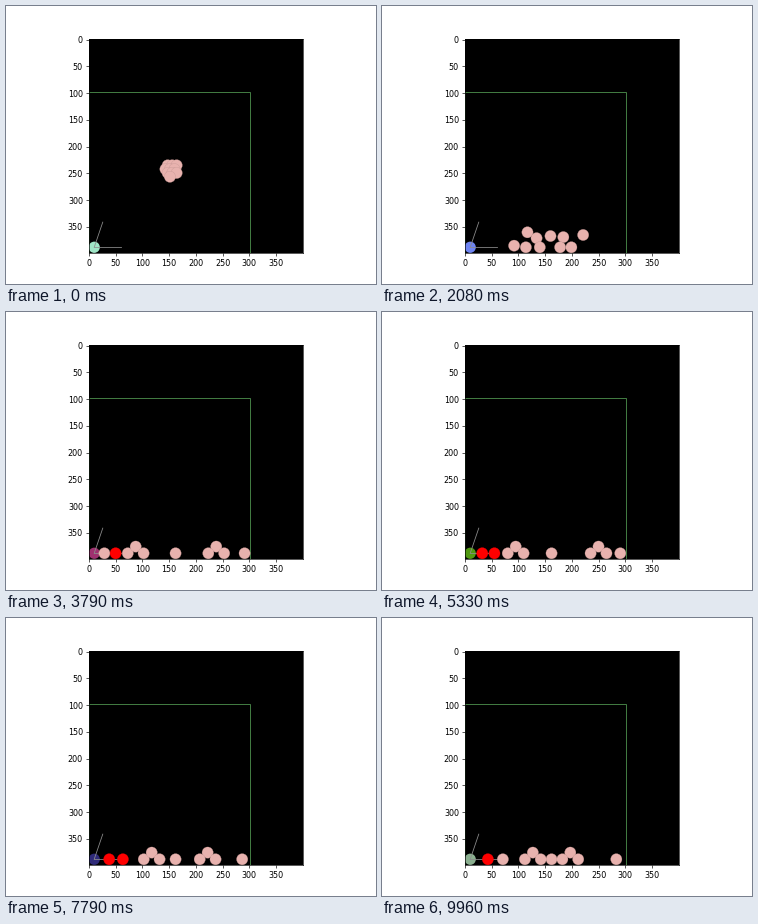
Animation, 370 px wide and 278 px high, one loop 10000 ms. Source, as a matplotlib script:

```python
import numpy as np
import matplotlib.pyplot as plt
from matplotlib.animation import FuncAnimation
from matplotlib.patches import Circle

LOOP_MS, FRAMES, DPI = 10000, 240, 64
RADIUS, FLOOR = 10.5, 388
PINK, RED, RIM, GREEN, GREY = "#e8b2ae", "#ff0000", "#bd908d", "#437d43", "#8c8c8c"
AGENT = np.array([10, FLOOR])

# Steps at which the cluster is spread, lands, is heaped up and has rolled out
BURST, IMPACT, PILE, REST = 21, 33, 49, 90
DROP, GRAVITY = 44, 0.085
SIDE, CAP = 14.8, 12.5  # pyramid: half its base, height of its top ball

# Cluster: a triangular lattice of three full rows and one ball below
CELLS = [(row, col) for row in range(3) for col in range(3)] + [(3, 1)]
BALLS = np.array([(138 + 20 * col - 10 * (row % 2), 267 + 17 * row)
                  for row, col in CELLS], float)
CENTRE = BALLS.mean(axis=0)

# Heap: x of each ball and its height above the floor
HEAP_X = np.array([117, 160, 221, 92, 134, 184, 114, 178, 199, 140])
HEAP_LIFT = np.array([28, 21, 23, 3, 17, 19, 0, 0, 0, 0])
REST_LIFT = np.array([0, 0, 0, 0, CAP, CAP, 0, 0, 0, 0])


def rolling(k):
    """x of the balls once two pyramids and four loose balls roll about."""
    u = (k - REST) / (FRAMES - 1 - REST)
    left = np.interp(k, [REST, 127, 206, 239], [87.5, 95, 125, 127])
    right = np.interp(k, [REST, 118, 239], [238, 254, 197])
    wall = np.interp(k, [118, 239], [291, 283])
    return np.array([left - SIDE, 162, wall, 29 + 14 * u, left,
                     right, 50 + 21 * u, right - SIDE, right + SIDE, left + SIDE])


def positions(k):
    """Centres of all balls at step k."""
    if k <= BURST:
        u = k / BURST
        spread = 0.42 + 0.58 * (1 - (1 - u) ** 3)
        return CENTRE + (BALLS - CENTRE) * spread + [0, DROP * (u**2 - 1)]

    if k <= PILE:
        n = k - BURST
        slide = max(k - IMPACT, 0) / (PILE - IMPACT)
        x = BALLS[:, 0] + (HEAP_X - BALLS[:, 0]) * slide
        y = np.minimum(BALLS[:, 1] + 3.4 * n + GRAVITY * n**2, FLOOR - HEAP_LIFT)
        return np.column_stack([x, y])

    n = k - PILE
    eased = 1 - (1 - min(n / (REST - PILE), 1)) ** 2
    x = HEAP_X + (rolling(max(k, REST)) - HEAP_X) * eased
    lift = np.maximum(HEAP_LIFT - n - GRAVITY * n**2, REST_LIFT)
    return np.column_stack([x, FLOOR - lift])


flicker = np.random.default_rng(7).random((FRAMES, 3))

fig, ax = plt.subplots(figsize=(370 / DPI, 278 / DPI), dpi=DPI)
ax.set_facecolor("black")
ax.set_aspect("equal")
ax.set_xlim(-0.5, 399.5)
ax.set_ylim(399.5, -0.5)
ax.set_xticks(range(0, 400, 50))
ax.set_yticks(range(0, 400, 50))
ax.spines.right.set_position(("outward", 0.6))
ax.tick_params(length=3.15, pad=3.15, width=0.72, labelsize=9)
for spine in ax.spines.values():
    spine.set_linewidth(0.72)

# Walls of the box; the left one is half hidden by the axis
ax.plot([-2, 302, 302], [97, 97, 402], color=GREEN, lw=1.1,
        solid_joinstyle="miter", zorder=1)
ax.plot([0.7, 0.7], [97, 402], color=GREEN, alpha=0.45, lw=1.1, zorder=1)

agent = ax.add_patch(Circle(AGENT, RADIUS, lw=0, zorder=2))
for tip in [(60, FLOOR), (26, 341)]:
    ax.plot(*zip(AGENT, tip), color=GREY, lw=0.9, zorder=3)

balls = [ax.add_patch(Circle(spot, RADIUS, lw=0.3, zorder=4)) for spot in BALLS]


def draw(k):
    agent.set_facecolor(flicker[k])
    for ball, centre in zip(balls, positions(k)):
        seen = 20 < np.hypot(*(centre - AGENT)) < 60
        ball.set_center(centre)
        ball.set_facecolor(RED if seen else PINK)
        ball.set_edgecolor(RED if seen else RIM)
    return [agent, *balls]


anim = FuncAnimation(fig, draw, frames=FRAMES, interval=LOOP_MS / FRAMES,
                     repeat=True, repeat_delay=0)
plt.show()
```
